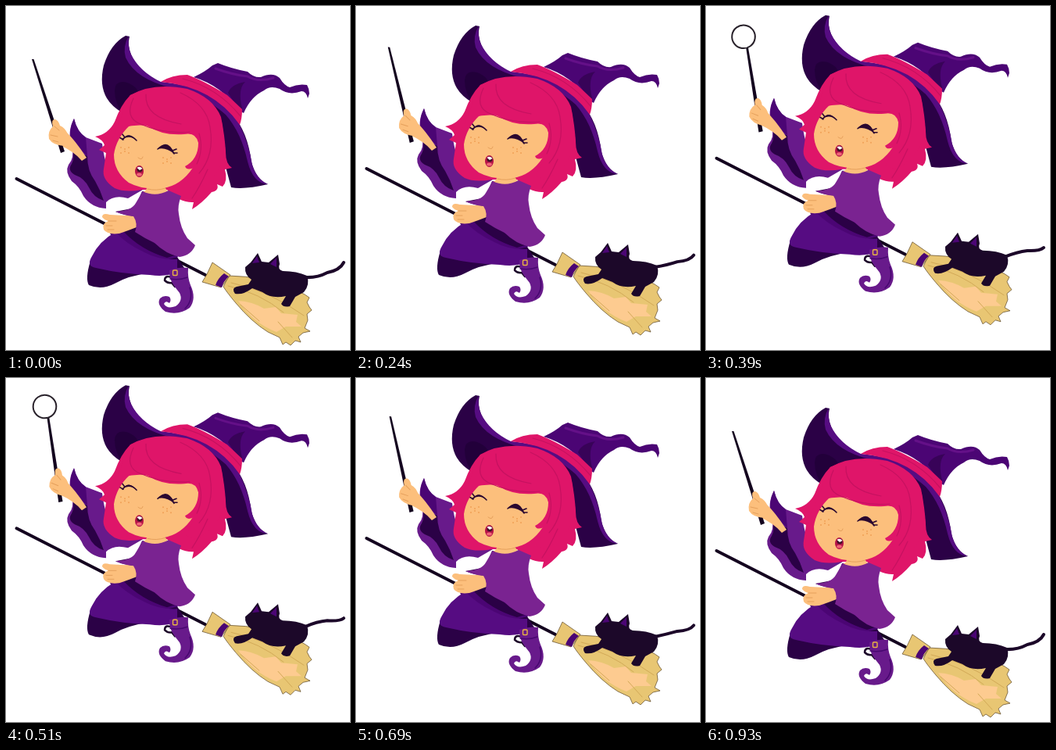
An HTML page that plays this animation: 440x440 px, repeating every 960 ms.

```html
<!DOCTYPE html>
<html lang="en">
<head>
<meta charset="utf-8">
<title>Witch on a broom</title>
<style>
  html, body { margin: 0; width: 100%; height: 100%; overflow: hidden; background: #fff; }
  svg { display: block; width: 440px; height: 440px; }
  .ink { fill: #14051f; }
  .night { fill: #2b0146; }
  .plum { fill: #4b0574; }
  .violet { fill: #560c82; }
  .orchid { fill: #681a8b; }
  .lilac { fill: #7a2391; }
  .hair { fill: #df1569; }
  .skin { fill: #fcbf7c; }
  .straw { fill: #e8c673; }
  .line { fill: none; stroke-linecap: round; stroke-linejoin: round; }
  .lash { stroke: #2b0830; stroke-width: 1.6; }
  .strand { stroke: #c61160; stroke-width: 1.2; }
  .crease { stroke: #e5a05c; stroke-width: 1; }
  .freckle { fill: #f0a056; }
</style>
</head>
<body>
<svg viewBox="0 0 440 440">
  <g id="rider">
    <!-- broom -->
    <path class="line" stroke="#14051f" stroke-width="4" d="M13.500 221L255 344"/>
    <path class="straw" stroke="#5b4526" stroke-width=".7" d="M285 345Q330 346 358 359Q378 365 388 373L385 379L388 385L391 389L385 394L386 402L382 412L389 416L380 418L374 423L377 430L370 428L364 434L358 430L354 433L350 424L335 417Q314 404 294 380Q283 367 278 359Z"/>
    <path fill="#fdcb90" d="M297 377Q315 378 330 387L345 385L352 393L373 395L371 404L378 410L358 410L346 417Q315 405 297 377Z"/>
    <path class="line" stroke="#d2a957" stroke-width="1" d="M284 358Q325 367 355 392M288 354Q335 363 381 396M300 382L324 403M348 404L366 424"/>
    <path class="straw" stroke="#5b4526" stroke-width=".7" d="M264 328L287 344L275 360L251 353L257 343Z"/>
    <path class="plum" d="M279 342L285 346Q278 352 276 360L268 357Q271 348 279 342Z"/>

    <!-- cat -->
    <path id="tail" class="line" stroke="#1c0829" stroke-width="4"/>
    <path fill="#1c0829" d="M306 334L313 328L322 316L327 327L336 328L348 318L350 330Q347 337 354 339Q372 339 385 345Q389 357 381 366L370 372L363 384Q355 386 352 381L358 371Q340 375 328 366L315 361Q303 370 293 368Q288 361 295 359L310 356L314 350Q305 344 306 334Z"/>
    <path class="plum" d="M315 329L321 320L324 328ZM338 330L346 322L346 334Z"/>

    <!-- far leg and foot -->
    <path class="night" d="M108 326Q101 349 106 357Q122 364 139 355Q156 345 185 341Z"/>
    <path class="night" d="M196 300L232 324L236 346L205 344Z" fill-opacity="0"/>
    <path class="night" d="M200 308L217 318L230 338L212 336Z"/>
    <path class="line" stroke="#1c0829" stroke-width="2.500" d="M214 348Q203 343 203 351Q207 355 212 354L216 359"/>

    <!-- torso and near leg -->
    <path class="plum" d="M174 237L207 237L217 267L211 300L220 321L192 328L148 312L133 291L151 283L162 264Z"/>
    <path class="violet" d="M140 289Q119 301 110 320Q102 333 115 335Q149 343 184 344Q206 347 219 340L219 324Q195 325 177 315Q153 304 140 289Z"/>
    <path class="night" d="M150 288L166 282Q188 305 216 319L206 322Q172 312 150 288Z"/>
    <path class="orchid" d="M209 338Q221 333 233 335Q232 347 236 357Q244 374 235 386Q221 396 204 391Q192 382 197 374Q202 369 209 372Q212 376 209 380Q204 376 202 381Q206 388 217 384Q227 377 222 367L215 358Q208 348 209 338Z"/>
    <path class="line" stroke="#470770" stroke-width="1.500" d="M210 349Q222 351 232 347M235 360Q240 376 229 387"/>
    <rect x="213.500" y="338" width="5.500" height="6.500" rx="1" fill="none" stroke="#eab542" stroke-width="1.400"/>

    <!-- far sleeve and arm -->
    <path class="orchid" d="M87 144Q91 161 102 168L123 176Q127 210 142 227L175 235L156 246Q138 241 128 251L128 259Q109 258 99 243Q94 231 84 224Q75 212 80 203Q88 194 84 180Q78 160 87 144Z"/>
    <path class="plum" d="M87 144Q91 161 102 168L104 192Q90 178 84 178Q79 160 87 144Z"/>
    <path class="night" d="M85 182L104 192Q104 211 114 224Q121 236 125 249Q112 245 106 232Q100 220 88 216Q78 210 84 202Q88 195 85 182Z"/>
    <path class="skin" d="M75 159Q88 171 103 194L97 198Q87 186 69 178Z"/>

    <!-- wand hand -->
    <g id="hand">
      <path class="ink" d="M33 68L35.500 68L75 186L70 188Z"/>
      <path class="skin" d="M60 154Q57 145 63 145Q67 146 69 153Q76 156 79 164Q81 174 74 179Q60 178 55 170Q53 160 60 154Z"/>
      <path class="line crease" d="M62 154L68 159M57 165L66 167M60 172L67 174"/>
      <circle id="glow" cx="32.500" cy="70" r="14.800" fill="#fff" stroke="#29222b" stroke-width="2"/>
    </g>

    <!-- hat underside and brim -->
    <path class="night" d="M153 38Q134 48 125 76Q119 101 129 118Q135 128 148 136L268 158L288 232Q305 235 335 228Q320 222 314 200Q309 160 289 138L240 104L196 97Q168 82 160 62Q155 50 158 39Z"/>
    <path class="violet" d="M157 38Q155 50 160 62Q171 84 198 97Q270 103 299 152Q311 178 315 203Q321 222 335 228Q316 227 309 199Q301 162 281 139Q253 114 213 105Q166 94 153 66Q149 52 157 38Z"/>
    <path fill="#22003a" d="M139 108Q140 94 155 98Q172 104 170 120L150 138Q139 124 139 108Z"/>

    <!-- hair, back -->
    <path class="hair" d="M159 114Q188 97 232 106Q265 117 275 142Q280 167 281 187Q281 202 289 207L280 209Q284 224 277 231L270 228Q273 236 263 238Q251 252 238 260L240 251Q222 252 206 235L174 235Q152 239 139 233Q122 222 125 208L128 188L119 184L126 178Q124 171 114 167Q131 164 139 148Q147 126 159 114Z"/>

    <!-- neck and face -->
    <path class="skin" d="M180 222L203 223Q201 235 211 239Q193 248 175 238Q183 235 180 222Z"/>
    <path class="skin" d="M151 155Q173 149 202 157Q230 163 243 161Q251 181 243 200Q229 226 206 232Q178 237 157 226Q138 212 138 190Q137 168 151 155Z"/>
    <path class="line crease" d="M181 234Q192 237 204 233M169 194Q174 198 175 193"/>
    <path fill="#2b0830" d="M149 171Q157 159 167 172Q157 164 149 171ZM194 183Q207 168 215 189Q204 180 194 183Z"/>
    <path class="line lash" d="M149 171Q157 161 167 172M194 183Q207 171 215 189M150 171L145 168M152 168L148 163M213 185L218 183M214 188L219 188"/>
    <g id="freckles" class="freckle"></g>
    <ellipse cx="170.500" cy="211.500" rx="5.500" ry="7.500" fill="#b61548"/>
    <ellipse cx="171" cy="209" rx="3.500" ry="3.500" fill="#431027"/>
    <path fill="#fff" d="M167.500 207Q171 204 174.500 208L171 210Z"/>
    <ellipse cx="170.500" cy="215.500" rx="3.300" ry="2" fill="#f06578"/>

    <!-- hair, front -->
    <path class="hair" d="M159 114Q190 99 232 107Q266 119 276 148L281 187Q270 225 241 235L229 230Q240 214 240 207Q231 211 229 205Q246 196 246 175Q243 161 228 164Q200 166 182 154Q168 148 158 153Q141 169 138 190L127 184Q140 165 147 144Q150 125 159 114Z"/>
    <path class="line strand" d="M163 118Q151 143 172 151Q201 164 235 161M179 113Q177 143 224 151M223 111Q257 126 261 155Q267 191 247 214M247 163Q253 184 244 202M258 209Q247 233 238 246"/>

    <!-- hat crown and band -->
    <path class="plum" d="M240 91Q255 84 264 76L271 73Q288 80 309 84Q317 92 326 91Q341 84 350 92Q356 102 363 104Q374 99 385 101Q388 106 388 112L386 118Q384 109 378 109Q362 115 350 106Q338 101 330 108Q313 116 304 137L299 134Q276 102 240 91Z"/>
    <path class="line" stroke="#641088" stroke-width="3" d="M268 80Q290 88 309 90Q322 98 342 92"/>
    <path class="night" d="M284 111Q288 100 306 97Q296 106 302 131L299 134Z" opacity=".6"/>
    <path class="hair" d="M198 97Q212 88 232 88Q252 95 283 114L302 132Q302 144 299 152Q265 103 198 97Z"/>
    <path class="line strand" d="M226 93Q270 104 300 141"/>

    <!-- near sleeve and hand -->
    <path class="skin" d="M170 263L153 268L133 267Q123 264 123 270Q126 274 131 275Q122 278 125 286Q130 293 145 291Q157 287 172 281Z"/>
    <path class="line crease" d="M131 275L141 275M128 281L136 281M130 286L138 286"/>
    <path class="night" d="M140 263L166 258L168 269Q151 268 140 263Z"/>
    <path class="lilac" d="M175 237Q191 245 208 236L224 243Q219 256 221 266Q223 284 232 297L242 306Q237 319 222 321Q204 317 190 303Q177 297 165 289Q169 278 163 269Q151 268 140 263Q161 262 166 252Z"/>
  </g>
</svg>
<script>
  const get = id => document.getElementById(id);
  const LOOP = 960, STEP = 30, LAST = 30;

  const dot = (x, y) => `<circle cx="${x}" cy="${y}" r="1"/>`;
  const patch = (x, y) => [0, 1, 2, 3, 4, 5]
    .map(i => dot(x + (i % 3) * 5, y + (i > 2 ? 5 : 0) + (i % 2) * 2)).join('');
  get('freckles').innerHTML = patch(147, 181) + patch(201, 194);

  function pose(step) {
    const lift = (1 - Math.cos(step / LAST * 2 * Math.PI)) / 2;
    const sag = 8 * lift;
    get('rider').setAttribute('transform', `translate(0 ${-29 * lift})`);
    get('hand').setAttribute('transform', `rotate(${9.5 * lift} 70 171)`);
    get('glow').setAttribute('opacity', Math.min(1, Math.max(0, (lift - 0.58) / 0.28)));
    get('tail').setAttribute('d',
      `M382 347Q398 ${348 - sag} 411 ${341 - sag / 4}Q427 ${338 + sag / 4} 432 ${328 + sag}`);
  }

  // The first pose holds for two steps.
  function draw(now) {
    const step = Math.floor((now % LOOP) / STEP) - 1;
    pose(Math.max(0, step));
    requestAnimationFrame(draw);
  }
  pose(0);
  requestAnimationFrame(draw);
</script>
</body>
</html>
```
